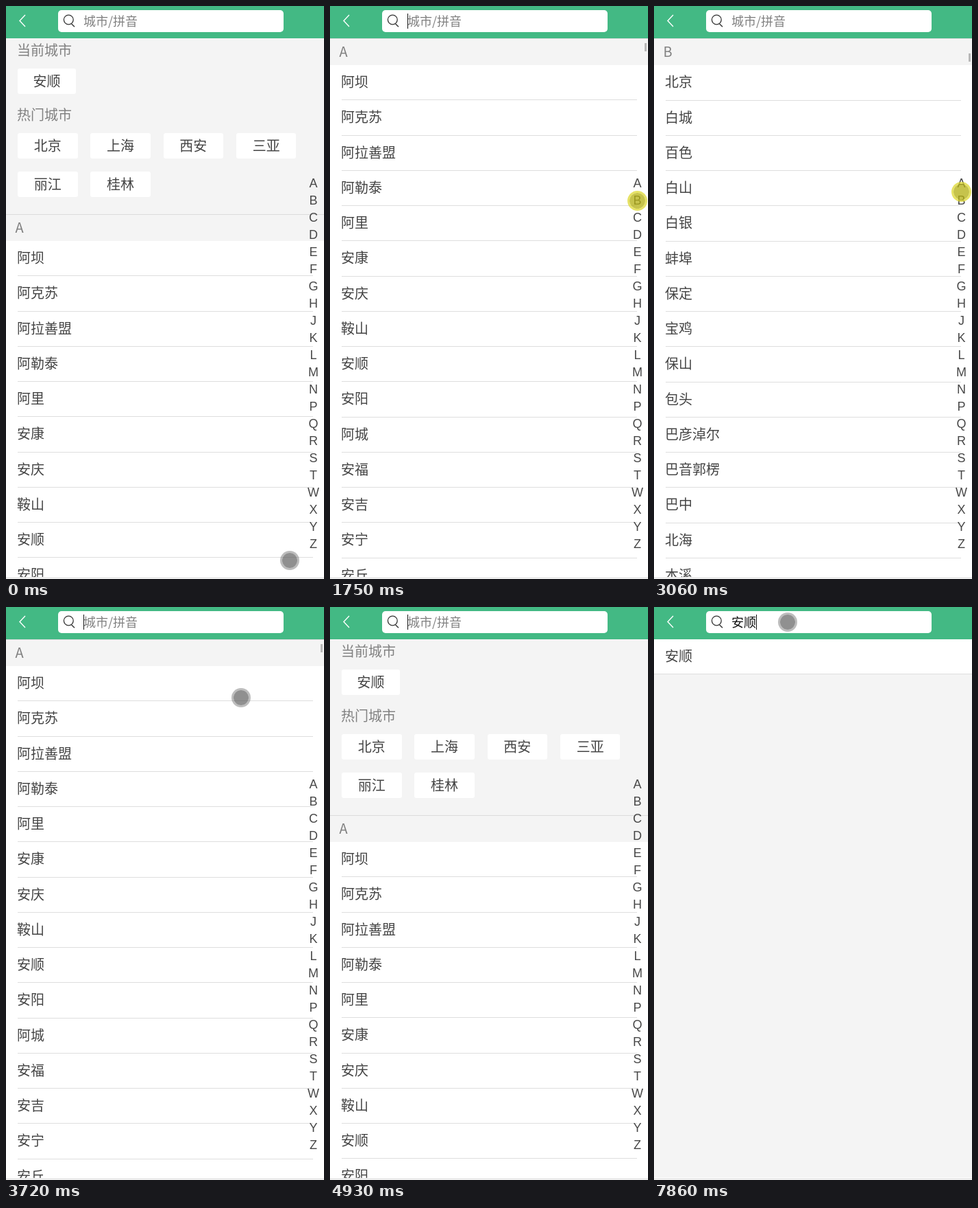
An HTML page for the animation above (8 s loop, 464 by 834 pixels).

```html
<!DOCTYPE html>
<html lang="zh-CN">
<head>
<meta charset="utf-8">
<title>城市选择</title>
<style>
html, body { margin: 0; width: 100%; height: 100%; overflow: hidden; background: #fff; }
body { font: 300 20px "Noto Sans CJK SC", "Noto Sans CJK", "Noto Sans", sans-serif; color: #444; }
#stage { position: relative; width: 464px; height: 834px; overflow: hidden; }
#stage > *, .abs { position: absolute; }
#head { left: 0; top: 0; width: 464px; height: 47px; background: #43b984; }
#head svg { position: absolute; left: 0; top: 0; fill: none; }
#box { left: 76px; top: 6px; width: 329px; height: 32px; border-radius: 5px; background: #fff; }
#field { left: 113px; top: 6px; height: 32px; line-height: 31px; font-size: 18px; color: #111; white-space: nowrap; }
#field.latin #val { font: 400 16px "Noto Sans", sans-serif; }
#hint { color: #808080; }
#caret { position: absolute; top: 5px; width: 1px; height: 22px; background: #111; }
#view { left: 0; top: 47px; width: 464px; height: 784px; overflow: hidden; background: #f4f4f4; }
#page { left: 0; top: 0; width: 464px; }
#hot { position: relative; height: 256px; }
.label { left: 16px; line-height: 20px; color: #808080; }
.chip { width: 87.5px; height: 37px; line-height: 35px; border-radius: 3px; background: #fff; text-align: center; }
.title { box-sizing: border-box; height: 39px; padding-left: 13.5px; line-height: 36px; color: #808080; border-top: 1px solid #dcdcdc; background: #f4f4f4; }
.rows { background: #fff; }
.row { box-sizing: border-box; height: 51.25px; margin: 0 16px 0 17px; line-height: 47px; text-indent: -1px; border-bottom: 1px solid #dedede; }
#result { left: 0; top: 0; width: 464px; height: 784px; background: #f4f4f4; }
#result div { height: 50px; line-height: 47px; padding-left: 16px; background: #fff; border-bottom: 1px solid #dedede; }
#foot { left: 0; top: 831px; width: 464px; height: 1px; border-bottom: 1px solid #d4d4d4; background: #fff; }
#index { left: 436px; top: 246px; width: 25px; text-align: center; font: 18px/25px "Liberation Sans", Arial, sans-serif; color: #484848; }
#bar { left: 459px; width: 3px; height: 12px; background: #b8b8b8; }
#ime { left: 112px; top: 32px; width: 370px; height: 68px; border: 1px solid #a9a9a9; background: #fff; }
#spell { left: 13px; top: 5px; height: 24px; padding-right: 1px; border-right: 1px solid #333; font: bold 20px/24px "Liberation Sans", Arial, sans-serif; color: #0b62bd; }
#rule { left: 0; top: 34px; width: 343px; height: 1px; background: #d5d5d5; }
#cands { left: 13px; top: 38px; display: flex; gap: 17px; line-height: 22px; color: #2f9be2; white-space: nowrap; }
#cands span:first-child { color: #ee4a40; }
#cands b { display: inline-block; width: 19px; font: 20px "Liberation Serif", serif; letter-spacing: 1px; }
#badge { left: 344px; top: 4px; width: 30px; height: 30px; background: #f08a70; }
#ime svg { position: absolute; left: 318px; top: 44px; fill: none; stroke-width: 2; }
#dot { width: 22px; height: 22px; margin: -13.5px; border: 3px solid rgba(110,110,110,.45); border-radius: 50%; background: rgba(85,85,85,.65) padding-box; }
#dot.down { width: 23px; height: 23px; margin: -14.5px; border: 3.5px solid rgba(222,217,50,.75); background: rgba(180,176,20,.76) padding-box; }
</style>
</head>
<body>
<div id="stage">
  <div id="view">
    <div id="page" class="abs"><div id="hot"></div></div>
    <div id="result" class="abs"><div>安顺</div></div>
  </div>
  <div id="index"></div>
  <div id="bar"></div>
  <div id="foot"></div>
  <div id="head">
    <div id="box" class="abs"></div>
    <svg width="110" height="47"><path d="M28 13 20 21.5 28 30" stroke="#fff" stroke-width="1.4"/><path d="M95.6 26 100 30.3" stroke="#333" stroke-width="1.4"/><circle cx="91.3" cy="20" r="6.9" stroke="#333" stroke-width="1.3"/></svg>
    <div id="field" class="abs"><span id="val"></span><i id="caret"></i><span id="hint">城市/拼音</span></div>
  </div>
  <div id="ime">
    <div id="spell" class="abs"></div>
    <div id="rule" class="abs"></div>
    <div id="cands" class="abs"></div>
    <svg width="30" height="18"><path d="M8 3 3 8 8 13" stroke="#dcc9c6"/><path d="M20 3 25 8 20 13" stroke="#ee6a4c"/></svg>
    <div id="badge" class="abs"></div>
  </div>
  <div id="dot"></div>
</div>
<script>
const LOOP = 8000, STEP = 109;
const TOUCH = 1635, DRAG = 3840, DROP = 4388, TYPE = 5790, COMMIT = 6880;
const $ = id => document.getElementById(id);
const add = (parent, cls, text, css = '') => {
  const el = document.createElement('div');
  el.className = cls;
  el.textContent = text;
  el.style.cssText = css;
  return parent.appendChild(el);
};
const show = (el, on) => { el.style.display = on ? '' : 'none'; };

const cities = {
  A: '阿坝 阿克苏 阿拉善盟 阿勒泰 阿里 安康 安庆 鞍山 安顺 安阳 阿城 安福 安吉 安宁 安丘 安溪 安义',
  B: '北京 白城 百色 白山 白银 蚌埠 保定 宝鸡 保山 包头 巴彦淖尔 巴音郭楞 巴中 北海 本溪 毕节 滨州 亳州',
  C: '重庆 成都 长春 长沙 常德 昌都 昌吉 常州 长治 巢湖 朝阳 潮州 承德 郴州 赤峰 池州 崇左 楚雄',
  D: '大理 大连 丹东 大庆 大同 大兴安岭 达州 德宏 德阳 德州 定西 迪庆 东莞 东营 敦煌 登封 东阳 当阳'
};

// Static page
const hot = $('hot');
add(hot, 'abs label', '当前城市', 'top:7px');
add(hot, 'abs chip', '安顺', 'left:17px;top:44px;width:85px');
add(hot, 'abs label', '热门城市', 'top:101px');
['北京', '上海', '西安', '三亚', '丽江', '桂林'].forEach((name, i) =>
  add(hot, 'abs chip', name, `left:${17 + i % 4 * 106.3}px;top:${138 + (i >> 2) * 56}px`));
const titles = Object.entries(cities).map(([letter, names]) => {
  const title = add($('page'), 'title', letter);
  const rows = add($('page'), 'rows', '');
  names.split(' ').forEach(name => add(rows, 'row', name));
  return title;
});
const tops = titles.map(el => el.offsetTop - .1);
for (const c of 'ABCDEFGHJKLMNPQRSTWXYZ') add($('index'), '', c);

// Pointer stops: time, x, y, pressed from here on
const stops = [
  [0, 413, 806], [540, 262, 417], [860, 245, 211], [1420, 448, 258],
  [TOUCH, 448, 258, 1], [2190, 448, 331, 1], [2520, 448, 331, 1], [3420, 448, 258],
  [DRAG, 330, 117], [4066, 330, 117, 1], [DROP, 300, 355], [4820, 207, 110],
  [5080, 197, 24, 1], [5260, 197, 24], [TYPE, 194, 21], [LOOP, 194, 21]
];

function pointer(t) {
  const i = stops.findIndex(p => p[0] > t);
  const [a, b] = [stops[i - 1], stops[i]];
  const k = 1 - (1 - (t - a[0]) / (b[0] - a[0])) ** 2;
  return { x: a[1] + (b[1] - a[1]) * k, y: a[2] + (b[2] - a[2]) * k, down: a[3] };
}

// The index follows the finger one step late; the drag follows it directly
function scrollAt(t) {
  if (t < TOUCH || t >= DROP) return 0;
  if (t >= DRAG) return Math.max(0, tops[0] - (pointer(t).y - 117));
  const letter = Math.round((pointer(t - STEP).y - 258) / 25);
  return tops[Math.max(0, letter)];
}

function caretOn(t) {
  if (t < 1330) return false;
  if (t < TYPE) return (t - 1330) % 1060 < 530;
  return t < 7430 || t >= 7860;
}

function typed(t) {
  if (t >= COMMIT) return '安顺';
  const keys = [TYPE, 5910, 6120, 6220, 6450, 6450];
  return 'anshun'.slice(0, keys.filter(k => k <= t).length);
}

function candidates(text) {
  const first = text.length < 3 ? '按' : text === 'anshun' ? '安顺' : '暗示';
  const rest = first === '按' ? '安俺暗案' : '按安俺暗';
  return [first, ...rest].map((w, i) => `<span><b>${i + 1}.</b>${w}</span>`).join('');
}

let shown;
function drawText(text, composing) {
  if (text === shown) return;
  shown = text;
  $('val').textContent = text;
  $('field').classList.toggle('latin', composing);
  show($('hint'), !text);
  show($('ime'), composing);
  $('spell').textContent = text.replace(/^an(?=s)/, "an'");
  $('cands').innerHTML = candidates(text);
}

function draw(t) {
  const held = Math.floor(t / STEP) * STEP;
  const p = pointer(t >= 5000 ? t : held);
  const dot = $('dot');
  dot.style.left = p.x + 'px';
  dot.style.top = p.y + 'px';
  dot.className = p.down ? 'down' : '';
  show(dot, t < 4925 || t >= 5080);

  const scroll = scrollAt(held);
  $('page').style.top = -scroll + 'px';
  $('bar').style.top = 49.7 + scroll * .0167 + 'px';
  show($('bar'), t >= TOUCH && t < 4800);

  drawText(typed(t), t >= TYPE && t < COMMIT);
  show($('caret'), caretOn(t));
  show($('result'), t >= COMMIT);
  show($('index'), t < COMMIT);
}

let start;
function frame(now) {
  start ??= now;
  draw((now - start) % LOOP);
  requestAnimationFrame(frame);
}
draw(0);
requestAnimationFrame(frame);
</script>
</body>
</html>
```
